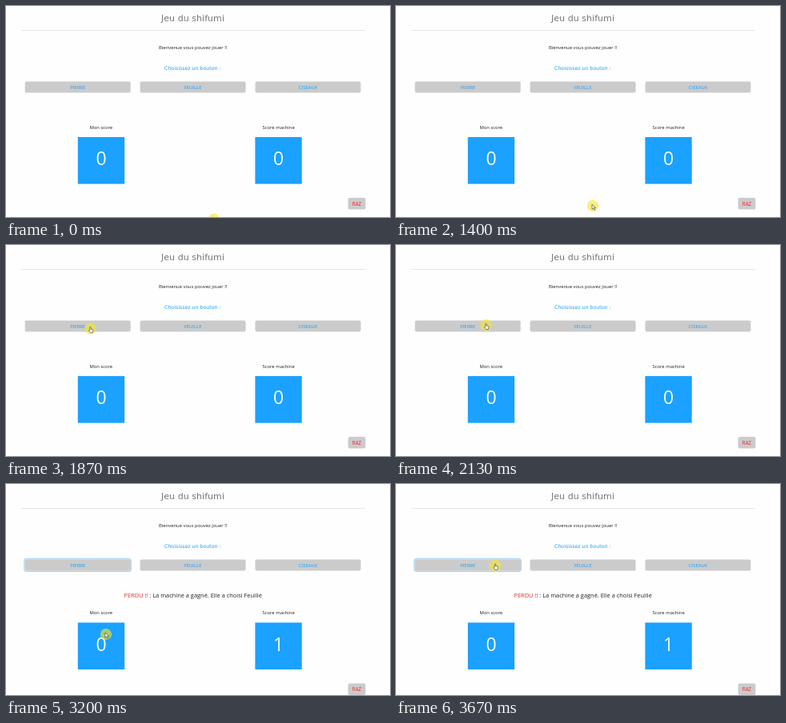
An HTML page that plays this animation: 480x264 px, repeating every 3990 ms.

```html
<!DOCTYPE html>
<html lang="fr">
<head>
<meta charset="utf-8">
<title>Jeu du shifumi</title>
<style>
  html, body { margin: 0; width: 100%; height: 100%; overflow: hidden; background: #fefefe; }
  svg { display: block; width: 480px; height: 264px; }
  text { font: 5.9px "Open Sans", "Noto Sans", sans-serif; fill: #222; text-anchor: middle; }
  .heading { font: 11.1px "DejaVu Sans", sans-serif; fill: #777; }
  .prompt { font: 6.25px "DejaVu Sans", sans-serif; fill: #1c9df5; }
  .button { fill: #cbcbcb; }
  .choice { fill: #1c9df5; }
  .score { font-size: 23px; fill: #f4faff; }
  .tile { fill: #1ba1ff; }
  .result { font-size: 7.43px; }
  .red { fill: #f5252b; }
</style>
</head>
<body>
<svg viewBox="0 0 480 264">
  <text class="heading" x="233.5" y="19">Jeu du shifumi</text>
  <path d="M19 30.5H449" stroke="#e6e6e9"/>
  <text x="233.7" y="53.6">Bienvenue vous pouvez jouer !!</text>
  <text class="prompt" x="233.3" y="80">Choisissez un bouton :</text>

  <rect id="focus" x="22.8" y="93.3" width="133.6" height="16.2" rx="2.5" fill="#d9efff" stroke="#9ecdf0" stroke-width=".9"/>
  <g id="choices"></g>

  <text id="result" class="result" x="233.7" y="142"><tspan class="red">PERDU !!</tspan> : La machine a gagné. Elle a choisi Feuille</text>

  <g id="lower">
    <text x="118.8" y="154">Mon score</text>
    <rect class="tile" x="89.8" y="164" width="58.4" height="58.6"/>
    <text class="score" x="119" y="199.3">0</text>
    <text x="340.6" y="154">Score machine</text>
    <rect class="tile" x="311.4" y="164" width="58.4" height="58.6"/>
    <text id="machine" class="score" x="340.6" y="199.3">0</text>
    <rect class="button" x="427.6" y="240" width="21.8" height="14.5" rx="2"/>
    <text class="red" x="438.5" y="249.6" style="font-size:6.2px">RAZ</text>
  </g>

  <g id="pointer">
    <circle r="7.2" fill="#f5e628" opacity=".62"/>
    <path id="arrow" d="M-1-2V4.2L.5 2.9 1.7 5.4 2.8 4.9 1.7 2.5H3.5Z" fill="#fff" stroke="#333" stroke-width=".6"/>
    <path id="hand" d="M-.7-1.7Q0-2.5.6-1.7V.6L3 1.2Q3.6 1.5 3.4 2.6L2.7 5.3H-.2L-2 2.4Q-1.8 1.3-.7 2.1Z" fill="#fff" stroke="#333" stroke-width=".6"/>
  </g>
</svg>
<script>
const LOOP = 3990, TICKS_PER_SECOND = 15, CLICK_TICK = 42;
const byId = id => document.getElementById(id);
const show = (id, visible) => byId(id).style.display = visible ? '' : 'none';

byId('choices').innerHTML = ['PIERRE', 'FEUILLE', 'CISEAUX'].map((label, i) => {
  const x = 23.7 + 143.9 * i;
  return `<rect class="button" x="${x}" y="94.4" width="132" height="14.2" rx="2"/>
    <text class="choice" x="${x + 66}" y="104.2">${label}</text>`;
}).join('');

// Pointer path: [tick, x, y]
const path = [
  [0, 260, 267], [20, 260, 267], [21, 246, 250], [24, 143, 152.3], [25, 143, 152.3],
  [26, 128, 133], [28, 105.5, 104.5], [30, 118, 101], [32, 112.5, 100.3],
  [45, 112.5, 100.3], [46, 114, 112], [48, 125, 188], [49, 128, 178],
  [51, 123, 111], [53, 122.8, 102.8], [55, 124, 102], [60, 124, 102]
];

function positionAt(tick) {
  const next = Math.max(1, path.findIndex(key => key[0] >= tick));
  const [t0, x0, y0] = path[next - 1], [t1, x1, y1] = path[next];
  const k = (tick - t0) / (t1 - t0);
  return [x0 + (x1 - x0) * k, y0 + (y1 - y0) * k];
}

function draw(now) {
  const tick = Math.floor((now % LOOP + 5) * TICKS_PER_SECOND / 1000);
  const [x, y] = positionAt(tick);
  const clicked = tick >= CLICK_TICK;
  const overButton = y < 109;

  byId('pointer').setAttribute('transform', `translate(${x} ${y})`);
  show('hand', overButton);
  show('arrow', !overButton);
  show('focus', clicked);
  show('result', clicked);
  byId('machine').textContent = clicked ? 1 : 0;
  byId('lower').setAttribute('transform', `translate(0 ${clicked ? 9.4 : 0})`);
}

const start = performance.now();
function frame() {
  draw(performance.now() - start);
  requestAnimationFrame(frame);
}
frame();
</script>
</body>
</html>
```
